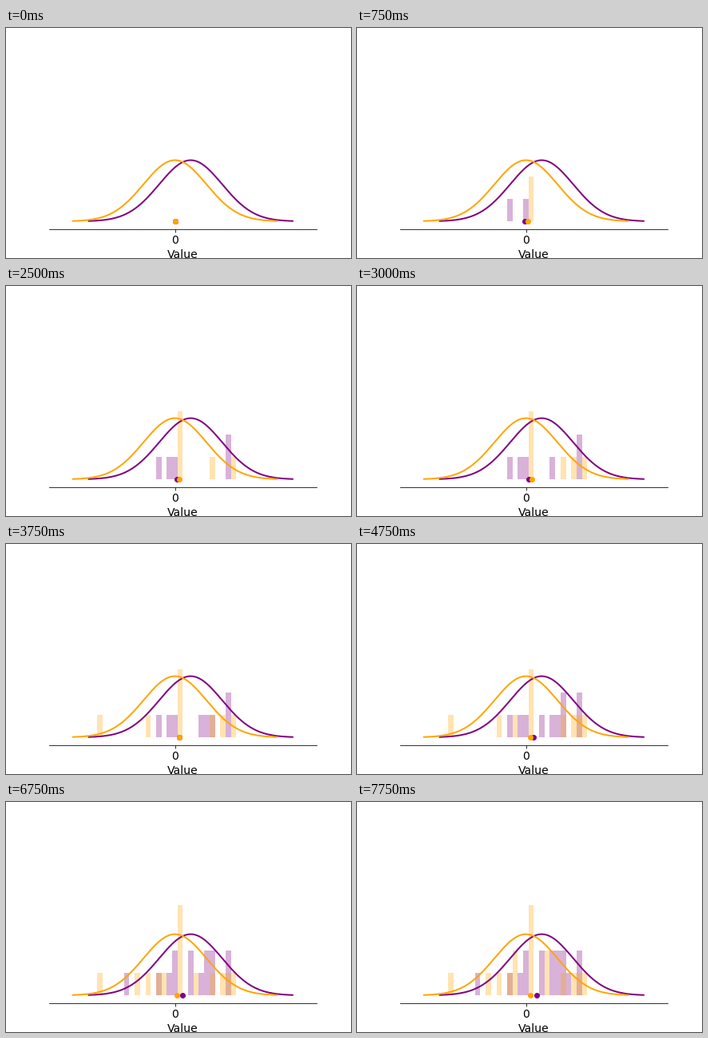
A matplotlib script that plays this animation: 432 px wide and 288 px high, repeating every 8000 ms.

```python
import numpy as np
import matplotlib.pyplot as plt
from matplotlib.animation import FuncAnimation

FRAMES, INTERVAL = 32, 250
X_MIN, X_MAX, N_BINS, N_TRIALS = -4, 4.5, 50, 40
STEP = 0.05  # size of every estimate update
WIDTH = (X_MAX - X_MIN) / N_BINS

# Distribution mean and the histogram bin hit on each trial
GROUPS = {
    "purple": (0.5, [20, 23, 33, 22, 33, 28, 29, 30, 26, 30, 14, 29, 23, 26, 28, 31]),
    "orange": (0.0, [24, 24, 30, 34, 24, 32, 18, 9, 33, 21, 20, 24, 16, 27, 27, 21]),
}

plt.rcParams.update({"font.family": "DejaVu Sans", "font.size": 14})
fig, ax = plt.subplots(figsize=(6, 4), dpi=72)
fig.subplots_adjust(left=0.125, right=0.9, bottom=0.125, top=0.88)
ax.set(xlim=(X_MIN, X_MAX), ylim=(-0.35, 7.35), xticks=[0], yticks=[])
ax.set_xticklabels(["0"])
ax.set_xlabel("Value")
ax.spines[["left", "right", "top"]].set_visible(False)

edges = X_MIN + WIDTH * np.arange(N_BINS)


def track(bins):
    """Estimate after each trial: a fixed step towards every new sample."""
    values = [0.0]
    for b in bins:
        sample = edges[b] + WIDTH / 2
        values.append(values[-1] + STEP * np.sign(sample - values[-1]))
    return values


def add_group(color, mean, bins):
    z = np.linspace(-3.24, 3.24, 200)
    pdf = np.exp(-z**2 / 2) / np.sqrt(2 * np.pi)
    ax.plot(mean + z, pdf * WIDTH * N_TRIALS, color=color, lw=2)
    bars = ax.bar(edges, np.zeros(N_BINS), WIDTH, align="edge",
                  color=color, alpha=0.3, linewidth=0)
    dot, = ax.plot([0], [0], "o", color=color, ms=6, zorder=4)
    return bars, dot, bins, track(bins)


groups = [add_group(color, *spec) for color, spec in GROUPS.items()]
ax.set(xlim=(X_MIN, X_MAX), ylim=(-0.35, 7.35))


def update(frame):
    # Samples arrive on odd frames, estimates follow on even ones
    artists = []
    for bars, dot, bins, values in groups:
        counts = np.bincount(bins[:(frame + 1) // 2], minlength=N_BINS)
        for bar, count in zip(bars, counts):
            bar.set_height(count)
            bar.set_visible(count > 0)
        dot.set_data([values[frame // 2]], [0])
        artists += [*bars, dot]
    return artists


anim = FuncAnimation(fig, update, frames=FRAMES, interval=INTERVAL,
                     repeat=True, repeat_delay=0, blit=False)
plt.show()
```
